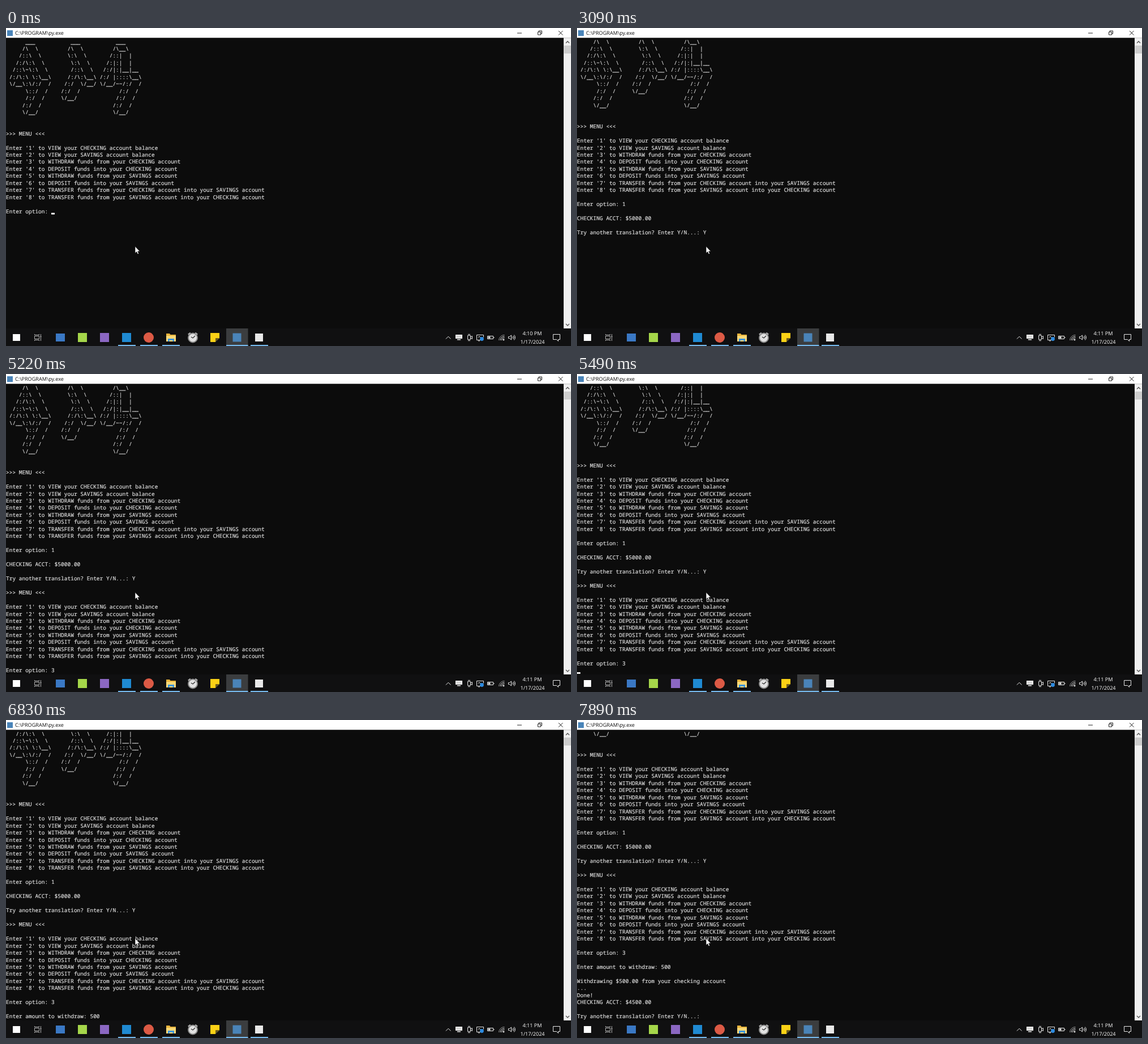
Animation, 998 px wide and 561 px high, one loop 8 s. Source, as an HTML page:

```html
<!DOCTYPE html>
<html lang="en">
<head>
<meta charset="utf-8">
<title>Terminal session</title>
<style>
  html, body { margin: 0; width: 100%; height: 100%; overflow: hidden; background: #0c0c0c; }
  #stage { position: relative; width: 998px; height: 561px; overflow: hidden; }
  #screen { position: absolute; left: 0; top: 17px; width: 985px; height: 513px; overflow: hidden; }
  #log {
    position: absolute; left: 0; top: 1.5px; margin: 0; color: #dcdcdc;
    font: 9.53px/12.475px "Noto Sans Mono", "DejaVu Sans Mono", monospace;
    font-variant-ligatures: none; text-rendering: geometricPrecision;
    -webkit-text-stroke: .2px #dcdcdc;
  }
  #caret { position: absolute; left: 0; top: 0; width: 6px; height: 3px; background: #f2f2f2; }
  svg { position: absolute; left: 0; top: 0; }
  text { font: 9.1px "Open Sans", "Noto Sans", sans-serif; text-rendering: geometricPrecision; }
  .line { fill: none; stroke: #e6e6e6; stroke-width: 1; }
  .dark { fill: none; stroke: #222; stroke-width: 1; }
</style>
</head>
<body>
<div id="stage">
  <div id="screen"><pre id="log"></pre><div id="caret"></div></div>

  <svg width="998" height="561" viewBox="0 0 998 561">
    <!-- title bar -->
    <rect width="998" height="17.3" fill="#fff"/>
    <rect x="2" y="4" width="10" height="10" fill="#4a84b8"/>
    <text x="16" y="12.4" fill="#111">C:\PROGRAM\py.exe</text>
    <path class="dark" d="M903 9h8M939.5 7h5v5h-5zM941 7V5h5.500v5H944.500M976 5l7.500 7.500M983.500 5L976 12.500"/>

    <!-- scroll bar -->
    <rect x="985" y="17.300" width="13" height="512.700" fill="#f0f0f0"/>
    <rect x="985.500" y="31" width="12.500" height="14" fill="#cdcdcd"/>
    <path d="M989 26.500l3-3 3 3M989 522l3 3 3-3" fill="none" stroke="#555" stroke-width="1.400"/>

    <!-- taskbar -->
    <rect y="530" width="998" height="31" fill="#101011"/>
    <rect x="389" y="530" width="38.500" height="31" fill="#3b3d3f"/>
    <path d="M198 560h31M237 560h31M276 560h31M389 560h38.500M432 560h31" stroke="#76b9ed" stroke-width="2"/>

    <rect x="12" y="540" width="13" height="12" fill="#fff"/>
    <path class="line" stroke-opacity=".75" d="M50.500 543.500h8v5h-8zM50.500 540v1.500h8V540M50.500 552v-1.500h8v1.500M61.500 540v12M60.500 544.500h2"/>
    <rect x="88" y="539" width="16" height="14" fill="#3a78c4"/>
    <rect x="127" y="538" width="16" height="16" fill="#a5d64a"/>
    <rect x="166" y="538" width="16" height="16" fill="#8b67c2"/>
    <rect x="205" y="538" width="16" height="16" fill="#1f8ad2"/>
    <circle cx="252" cy="546" r="9" fill="#dc5a45"/>

    <path d="M283 539h6l1.500 2H300v12h-17z" fill="#e9b43c"/>
    <path d="M283 543h17v10h-17z" fill="#fbd978"/>
    <path d="M286 553v-5h11v5h-2.500v-2h-6v2z" fill="#3c96dc"/>

    <path d="M322 541l4-3M338 541l-4-3" stroke="#aaa" stroke-width="3"/>
    <circle cx="330" cy="546.500" r="8" fill="#e2e2e2" stroke="#8c8c8c" stroke-width="2"/>
    <path d="M330 547l4-4M330 547l-3-2" stroke="#333" stroke-width="1.300"/>

    <path d="M361 538h16v9.500h-7V554h-9z" fill="#fcd116"/>
    <path d="M370 547.500h7l-7 6.500z" fill="#6a5a20"/>

    <rect x="400.500" y="538.500" width="15" height="15" fill="#4a84b8"/>
    <rect x="440" y="539" width="14" height="14" fill="#e8e8e8"/>

    <!-- tray -->
    <path class="line" d="M777 548.500l4.300-4.300 4.300 4.300"/>
    <path d="M794 541h12v7h-12zM797 549h6v1.500h-6z" fill="#f2f2f2"/>
    <path d="M796 543.500h8M796 545.500h8" stroke="#555" stroke-width=".7" stroke-dasharray="1 1"/>
    <path class="line" d="M815.500 542.500h5v7h-5zM820.500 545l3-1.500v5l-3-1.500M816 540.500h4M816 551.500h4"/>
    <path class="line" d="M838 550.500h-6.500v-9h12v4M834 546l2-2 2 2M834 552h3"/>
    <circle cx="840.500" cy="548.500" r="3.400" fill="#2d8be0"/>
    <path class="line" d="M850.500 543.500h10v5h-10zM862 545v2"/>
    <rect x="851.500" y="544.500" width="4" height="3" fill="#eee"/>
    <g class="line">
      <path d="M870.500 551a10 10 0 0 1 10-9.500" stroke="#999"/>
      <path d="M873 551a7.500 7.500 0 0 1 7.500-7"/>
      <path d="M875.500 551a5 5 0 0 1 5-4.500"/>
    </g>
    <circle cx="879" cy="550" r="1.400" fill="#eee"/>
    <path class="line" d="M887.500 544.500h2l3-2.500v8l-3-2.500h-2zM894.500 544.500q1.500 1.500 0 3M896 543q3 3 0 6M897.500 541.500q4 4.500 0 9"/>
    <g fill="#fff" text-anchor="middle">
      <text id="clock" x="929.500" y="542.300"></text>
      <text x="930" y="556.600">1/17/2024</text>
    </g>
    <path class="line" d="M966.500 540.500h12v9h-3v3l-3-3h-6z"/>

    <!-- pointer -->
    <path d="M228 385.300v11.900l2.700-2.400 1.900 4.200 2-.9-1.900-4h3.700z" fill="#fff" stroke="#000" stroke-width=".6"/>
  </svg>
</div>

<script>
  const LOOP = 8000, ROWS = 41, LINE_H = 12.475, CHAR_W = 5.718;

  const banner = String.raw`      ___           ___           ___
     /\  \         /\  \         /\__\
    /::\  \        \:\  \       /::|  |
   /:/\:\  \        \:\  \     /:|:|  |
  /::\~\:\  \       /::\  \   /:/|:|__|__
 /:/\:\ \:\__\     /:/\:\__\ /:/ |::::\__\
 \/__\:\/:/  /    /:/  \/__/ \/__/~~/:/  /
      \::/  /    /:/  /            /:/  /
      /:/  /     \/__/            /:/  /
     /:/  /                      /:/  /
     \/__/                       \/__/`;

  const options = [
    "VIEW your CHECKING account balance",
    "VIEW your SAVINGS account balance",
    "WITHDRAW funds from your CHECKING account",
    "DEPOSIT funds into your CHECKING account",
    "WITHDRAW funds from your SAVINGS account",
    "DEPOSIT funds into your SAVINGS account",
    "TRANSFER funds from your CHECKING account into your SAVINGS account",
    "TRANSFER funds from your SAVINGS account into your CHECKING account"
  ];
  const menu = ">>> MENU <<<\n\n" +
    options.map((o, i) => `Enter '${i + 1}' to ${o}\n`).join("") + "\nEnter option: ";
  const again = "\n\nTry another translation? Enter Y/N...: ";

  // The session in the order it is printed and typed.
  const parts = [
    banner + "\n\n\n" + menu,
    "1",
    "\n\nCHECKING ACCT: $5000.00" + again,
    "Y",
    "\n\n" + menu,
    "3",
    "\n",
    "\nEnter amount to withdraw: ",
    "5", "0", "0",
    "\n\nWithdrawing $500.00 from your checking account\n...\nDone!\nCHECKING ACCT: $4500.00" + again
  ];

  // [start ms, parts shown, caret on, extra scrolled rows]
  const steps = [
    [0, 1, 1], [70, 1, 0], [510, 1, 1], [840, 2, 1], [1040, 2, 0],
    [1170, 3, 1], [2100, 3, 0], [2630, 3, 1], [2760, 4, 1], [3090, 4, 0, 1],
    [3150, 5, 1], [3680, 5, 0], [3880, 6, 1], [4160, 6, 0], [4690, 6, 1], [5220, 6, 0],
    [5490, 7, 1], [5560, 8, 1], [6300, 8, 0], [6430, 9, 1], [6630, 10, 1], [6730, 11, 1],
    [6830, 11, 0], [7160, 12, 1], [7890, 12, 0]
  ];

  const log = document.getElementById("log");
  const caret = document.getElementById("caret");
  const clock = document.getElementById("clock");
  let shown = null;

  function show([, count, caretOn, extra = 0]) {
    const lines = parts.slice(0, count).join("").split("\n");
    const scroll = Math.max(0, lines.length - ROWS) + extra;
    const row = lines.length - 1 - scroll;
    const col = lines[lines.length - 1].length;
    log.textContent = lines.slice(scroll).join("\n");
    caret.style.visibility = caretOn ? "visible" : "hidden";
    caret.style.transform =
      `translate(${Math.round(col * CHAR_W)}px, ${Math.round(row * LINE_H + 9.8)}px)`;
  }

  function tick() {
    const t = performance.now() % LOOP;
    const step = steps.findLast(s => s[0] <= t);
    if (step !== shown) show(shown = step);
    const time = t < 310 ? "4:10 PM" : "4:11 PM";
    if (clock.textContent !== time) clock.textContent = time;
    requestAnimationFrame(tick);
  }
  tick();
</script>
</body>
</html>
```
